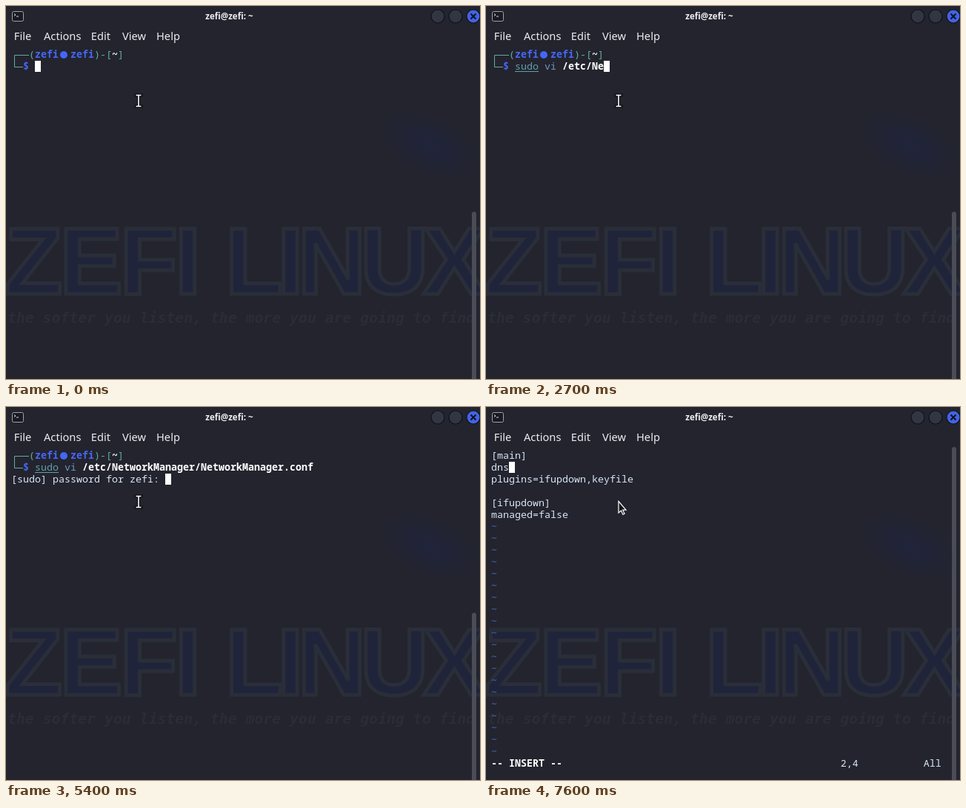
These frames come from a looping animation (640x504 px, 8 s). An HTML page:

```html
<!DOCTYPE html>
<html lang="en">
<head>
<meta charset="utf-8">
<title>Terminal</title>
<style>
html, body { margin: 0; width: 640px; height: 504px; overflow: hidden; background: #23242e; }
svg, pre { position: absolute; left: 0; top: 0; }
svg { font-family: "Noto Sans", "Open Sans", sans-serif; }
pre { left: 7px; top: 57px; margin: 0; font: 13.3333px/16px "Noto Sans Mono", "DejaVu Sans Mono", monospace; color: #d9e6f6; font-variant-ligatures: none; }
.cur, .match { display: inline-block; width: 8px; height: 15px; margin-top: 1px; line-height: 14px; vertical-align: top; background: #fff; color: #23242e; }
.match { background: #4c8fdc; color: #fff; }
.green { color: #62ad9e; }
.blue { color: #4567f5; font-weight: 700; }
.sudo { color: #629fac; text-decoration: underline; text-underline-offset: 2px; }
.cmd { color: #7096ba; }
.unknown { text-decoration: underline; text-underline-offset: 2px; }
.tilde { color: #4672c8; }
b { color: #fff; }
.dot { display: inline-block; width: 10px; height: 10px; margin: 4px 4px 0 2px; border-radius: 50%; background: #4567f5; vertical-align: top; }
</style>
</head>
<body>
<svg width="640" height="504">
  <defs>
    <radialGradient id="haze">
      <stop offset="0" stop-color="#20253f" stop-opacity=".8"/>
      <stop offset="1" stop-color="#20253f" stop-opacity="0"/>
    </radialGradient>
  </defs>
  <!-- wallpaper -->
  <ellipse cx="572" cy="188" rx="75" ry="42" fill="url(#haze)" transform="rotate(25 572 188)"/>
  <g font-family="Liberation Sans, Arial, sans-serif" font-weight="700" font-size="128" fill="#20243a" stroke="#2a2e38" stroke-width="5">
    <text x="-2" y="389" letter-spacing="-4">ZEFI</text>
    <text x="296" y="389" letter-spacing="-8">LINUX</text>
  </g>
  <text x="2" y="428" fill="#2a2d37" font-family="DejaVu Sans Mono, monospace" font-style="italic" font-weight="700" font-size="19.8">the softer you listen, the more you are going to find</text>
  <!-- title bar -->
  <rect x="8.5" y="7.5" width="15" height="13" rx="2" fill="#1a1b22" stroke="#a2a3a8"/>
  <path d="M11 10.5l2 1.5-2 1.5M14 14h3" fill="none" stroke="#d8d8dc"/>
  <text x="301.5" y="18" text-anchor="middle" font-size="11.6" font-weight="600" fill="#eeeef2">zefi@zefi: ~</text>
  <g stroke="#10131b" stroke-width="1.2">
    <circle cx="583" cy="14" r="9" fill="#323642"/>
    <circle cx="607" cy="14" r="9" fill="#323642"/>
    <circle cx="631" cy="14" r="9" fill="#4263e6"/>
    <path d="M627.5 10.5l7 7m0-7l-7 7" stroke-width="2"/>
  </g>
  <g font-size="14.67" fill="#ececf0">
    <text x="10.8" y="46">File</text>
    <text x="51" y="46">Actions</text>
    <text x="114.8" y="46">Edit</text>
    <text x="157" y="46">View</text>
    <text x="203" y="46">Help</text>
  </g>
  <rect id="thumb" x="629" width="6" height="460" rx="3" fill="#4a4c57"/>
  <path id="bracket" d="M31 66.5H11.5V82.5H23" fill="none" stroke="#62ad9e"/>
</svg>
<pre id="term"></pre>
<svg width="640" height="504" fill="none">
  <g id="beam">
    <path d="M175.5 120.5H182.5M179 120.5V135.5M175.5 135.5H182.5" stroke="#0c0d12" stroke-width="4" stroke-linecap="square"/>
    <path d="M175.5 120.5H182.5M179 120.5V135.5M175.5 135.5H182.5" stroke="#fff" stroke-width="1.6"/>
  </g>
  <path id="arrow" d="M179 127.5V143l3.5-3 2.3 5.2 2.2-1-2.3-5H189Z" fill="#15161c" stroke="#fff" stroke-width="1.2"/>
</svg>
<script>
const LOOP = 8000, USER = "zefi";
const COMMAND = "sudo vi /etc/NetworkManager/NetworkManager.conf ";
// [time in ms, characters typed so far]
const KEYS = [[0, 0], [400, 2], [600, 3], [700, 4], [800, 5], [1100, 7], [1200, 8], [1500, 9],
  [1700, 10], [1900, 11], [2000, 12], [2200, 13], [2500, 14], [2700, 15], [2800, 16], [2900, 17],
  [3000, 18], [3100, 19], [3300, 20], [3500, 21], [3700, 22], [3800, 23], [3900, 28],
  [4600, 29], [4700, 30], [4800, 31], [4900, 48]];
const ENTER = 5300, PASSWORD = 5400, EDITOR = 6000, INSERT = 6800;
const INSERT_KEYS = [[INSERT, 0], [7400, 1], [7500, 2], [7600, 3]];

const el = id => document.getElementById(id);
const span = (cls, text) => `<span class="${cls}">${text}</span>`;
const cursor = (char = " ") => span("cur", char);
const typed = (keys, t) => keys.filter(k => k[0] <= t).pop()[1];

function highlight(text) {
  const first = text.slice(0, 4), isCommand = first === "su" || first === "sudo";
  const head = span(first === "sudo" ? "sudo" : isCommand ? "cmd" : "unknown", first);
  return head + span("cmd", text.slice(4, 8)) + `<b>${text.slice(8)}</b>`;
}

function shell(t) {
  const prompt = "   " + span("green", "(") + span("blue", USER) + '<i class="dot"></i>' + span("blue", USER) +
    span("green", ")-[") + "<b>~</b>" + span("green", "]");
  const line = "  " + span("blue", "$") + " " + highlight(COMMAND.slice(0, typed(KEYS, t)));
  const lines = [prompt, line + (t < ENTER ? cursor() : "")];
  if (t >= PASSWORD) lines.push(`[sudo] password for ${USER}: ` + cursor());
  else if (t >= ENTER) lines.push(cursor());
  return lines;
}

function editor(t) {
  const inserting = t >= INSERT;
  const lines = ["[main]", "plugins=ifupdown,keyfile", "", "[ifupdown]", "managed=false"];
  let status = '&lt;etc/NetworkManager/NetworkManager.conf" 5L, 58B' + " ".repeat(11), position = "1,1";
  if (inserting) {
    const text = "dns".slice(0, typed(INSERT_KEYS, t));
    lines.splice(1, 0, text + cursor());
    status = "<b>-- INSERT --</b>" + " ".repeat(47);
    position = "2," + (text.length + 1);
  } else {
    lines[0] = cursor("[") + "main" + span("match", "]");
  }
  while (lines.length < 26) lines.push(span("tilde", "~"));
  return [...lines, status + position + " ".repeat(11) + "All"];
}

let shown = "";
function draw(now) {
  const t = now % LOOP, editing = t >= EDITOR;
  const html = (editing ? editor(t) : shell(t)).join("\n");
  if (html !== shown) {
    el("term").innerHTML = shown = html;
    el("thumb").setAttribute("y", editing ? 54 : 278);
    for (const id of ["bracket", "beam"]) el(id).style.display = editing ? "none" : "";
    el("arrow").style.display = editing ? "" : "none";
  }
  requestAnimationFrame(() => draw(performance.now() - start));
}
const start = performance.now();
draw(0);
</script>
</body>
</html>
```
